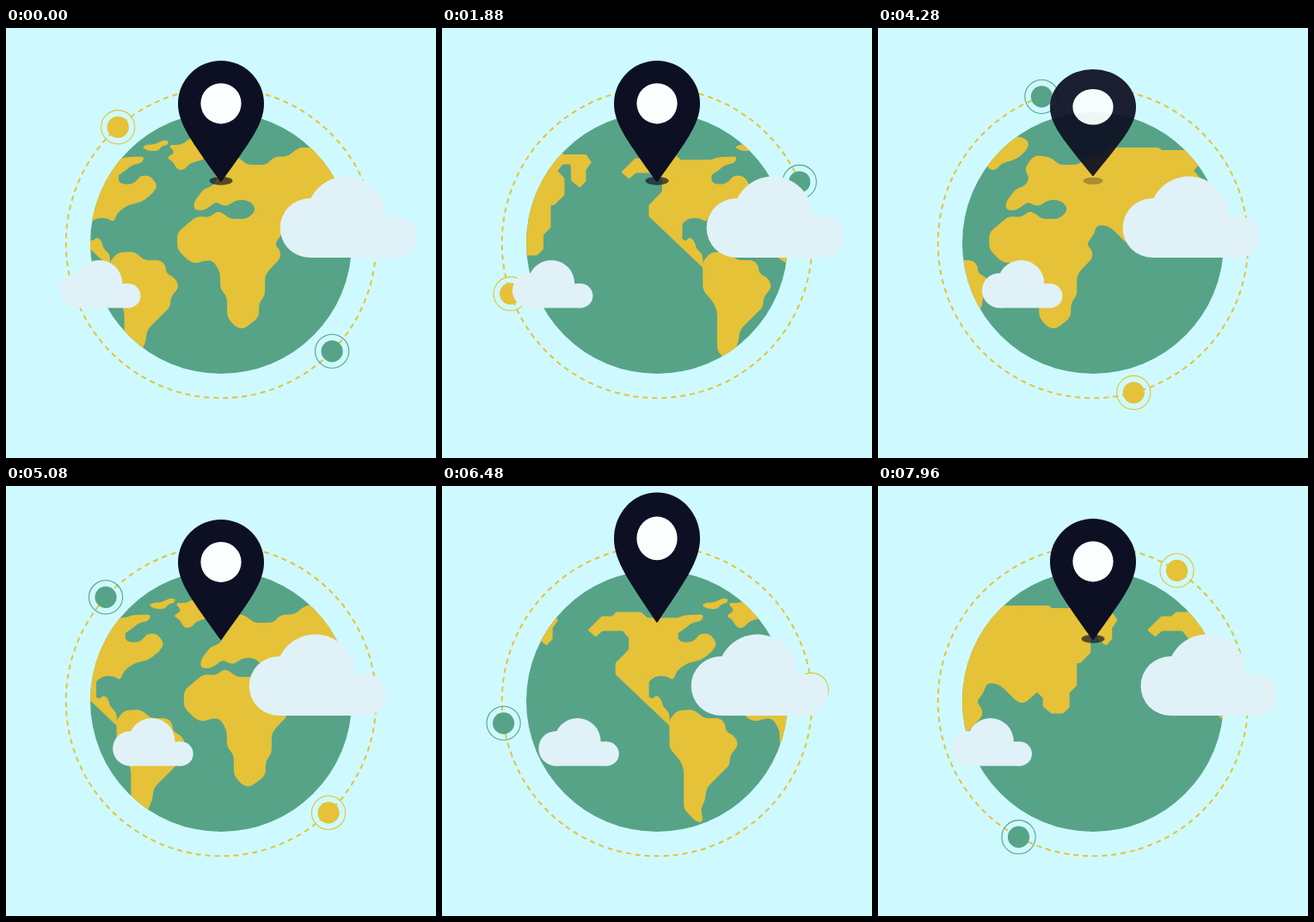
Recreate the animation shown at these times as an HTML page. Size 500 px wide and 500 px high, loop 8 s.

```html
<!DOCTYPE html>
<html lang="en">
<head>
<meta charset="utf-8">
<title>Turning globe</title>
<style>
  html, body { margin: 0; width: 100%; height: 100%; overflow: hidden; background: #cefaff; }
  svg { display: block; width: 100%; height: 100%; }
</style>
</head>
<body>
<svg viewBox="0 0 500 500">
  <defs>
    <clipPath id="disc"><circle cx="250" cy="250" r="152"/></clipPath>
    <g id="land" fill="#e5c238"></g>
    <g id="cloud" fill="#e0f2f8">
      <circle cx="34.5" cy="-34.5" r="34.5"/>
      <circle cx="77" cy="-48.5" r="46"/>
      <circle cx="135" cy="-24" r="24"/>
      <path d="M34 0V-40H110V-48H135V0Z"/>
    </g>
  </defs>
  <g id="orbit" fill="none">
    <circle cx="250" cy="250" r="180.3" stroke="#e5c238" stroke-width="2" stroke-dasharray="6 5"/>
  </g>
  <g id="moons"></g>
  <circle cx="250" cy="250" r="152" fill="#57a388"/>
  <g clip-path="url(#disc)">
    <use id="mapA" href="#land"/>
    <use id="mapB" href="#land"/>
  </g>
  <ellipse id="shade" cx="250" cy="177.8" fill="#0d1022"/>
  <g id="pin">
    <path d="M200 88A50 50 0 0 1 300 88C300 112 283 133 251 178.3Q250 179.7 249 178.3C217 133 200 112 200 88Z" fill="#0d1022"/>
    <circle cx="250" cy="87.8" r="23.6" fill="#fbfefe"/>
  </g>
  <use id="bigCloud" href="#cloud"/>
  <use id="smallCloud" href="#cloud"/>
</svg>
<script>
const LOOP = 8000, MAP_W = 485, MAP_SPEED = 97, SPIN = 35.88, DRIFT = 10040, HOP = 2000;
const $ = id => document.getElementById(id);
const NS = 'http://www.w3.org/2000/svg';

function add(parent, tag, attrs) {
  const el = document.createElementNS(NS, tag);
  for (const k in attrs) el.setAttribute(k, attrs[k]);
  parent.appendChild(el);
  return el;
}

// Closed polygon with corners rounded by up to r.
function rounded(text, r) {
  const pts = text.trim().split(/\s+/).map(p => p.split(',').map(Number));
  const toward = (a, b) => {
    const d = Math.hypot(b[0] - a[0], b[1] - a[1]);
    const k = Math.min(r / d, 0.5);
    return [a[0] + (b[0] - a[0]) * k, a[1] + (b[1] - a[1]) * k].map(v => v.toFixed(1));
  };
  return pts.map((p, i) => {
    const prev = pts[(i + pts.length - 1) % pts.length];
    const next = pts[(i + 1) % pts.length];
    return `${i ? 'L' : 'M'}${toward(p, prev)}Q${p} ${toward(p, next)}`;
  }).join('') + 'Z';
}

const lands = [
  // Europe, Africa and southern Asia
  [6, `240,164 250,149 261,148 273,152 280,159 303,159 311,150 328,149 340,139 400,139 400,235
    383,239 375,247 367,253 358,250 346,237 337,230 324,229 321,240 312,251 319,259 319,268 307,280 301,288
    301,311 294,320 294,336 281,347 274,350 266,347 257,336 257,313 249,303 249,284 241,271
    233,270 220,274 211,270 199,257 199,238 213,226 222,219 237,220 245,213 252,215 260,222 280,222
    289,214 289,207 281,200 267,200 258,207 251,206 244,202 231,212 219,212 218,203 230,187 240,184 246,175`],
  // East Asia
  [1, `341,139 360,139 368,147 386,147 391,142 439,142 444,147 470,147 476.5,156 470,165 470,178 463,185.5
    453,178 452,158.5 443,158.5 437,166 445,175 445,194 433,206 429,206 429,232 420.5,240.5 420.5,257 413,264.5
    399,264.5 389.5,256 389.5,246.5 382.5,239.5 374,247 350,225`],
  // Western North America down to the isthmus
  [1, `26,167.5 42,151.5 54,151.5 59,146.5 88,146.5 95.5,153.5 131,153.5 131,213 117,221 105,221 97,227
    97,246 104,248 113,263 121,268 121,279 58,219 58,206 73.5,190 73.5,177 66.5,168.5 43,168.5 35,175.5`],
  // Eastern North America
  [5, `90,153.5 131,153.5 138,150 161,149.5 158,157 147,159 137,167 128,173 133,181 144,182 151,179 156,171.5
    168,172 176,183 171,192 158,202 142,206 130,214 125,226 118,221 105,221 94,228 90,210`],
  [4, `92,225 104,220 93,232 93,244 100,249 105,243 111,247 113,256 121,264 120,276 92,249`],
  // South America
  [5, `120.5,272 130,261 149,260 161,270 180,270 186,277 186,285 197,291 201,301 191,314 191,324 164,351
    162,366 157,376 160,387 157,392 149,388 137.5,375 137.5,330 134,320 121,305`],
  // Northern islands
  [4, `158,139 163,135.5 173,135.5 182,130.5 189,131 188,136 181,137 177,143 166,143`],
  [6, `188,136 204,136 214,128 237,126 246,133 242,143 230,153 214,157 207,165 199,165 194,155 186,151 197,145`]
];
for (const [r, text] of lands) add($('land'), 'path', { d: rounded(text, r) });

const moons = [['#e5c238', 228.4], ['#57a388', 44.3]].map(([color, start]) => {
  const g = add($('moons'), 'g', {});
  add(g, 'circle', { r: 12.6, fill: color });
  add(g, 'circle', { r: 19.6, fill: 'none', stroke: color, 'stroke-width': 1.1 });
  return { g, start };
});

// Each row: time in the hop, then the values there.
const pinKeys = [
  [0, 0, 1, 1], [110, 0, 1, 1], [280, 1.5, .88, .93], [420, -30, 1.1, 1], [520, -23, 1.06, 1],
  [610, 2, .95, 1], [720, -3, 1.03, 1], [840, -2, 1.015, 1], [960, 1, .98, 1],
  [1040, 0, 1, 1], [1120, 1, .986, 1], [1160, 1, .986, 1], [1300, 0, 1, 1], [HOP, 0, 1, 1]
];
const shadeKeys = [
  [0, 13.5, .68], [120, 13.5, .68], [280, 11.5, .3], [360, 9, 0], [1120, 12.5, 0],
  [1160, 13.5, .56], [1240, 13.5, .68], [HOP, 13.5, .68]
];

function sample(keys, t) {
  const i = keys.findIndex(k => k[0] > t);
  const a = keys[i - 1], b = keys[i];
  const u = (t - a[0]) / (b[0] - a[0]);
  const e = u * u * (3 - 2 * u);
  return a.slice(1).map((v, j) => v + (b[j + 1] - v) * e);
}

const move = (el, x, y, rest = '') => el.setAttribute('transform', `translate(${x} ${y})${rest}`);

function draw(t) {
  const turn = SPIN * t / 1000;
  $('orbit').setAttribute('transform', `rotate(${-turn} 250 250)`);
  for (const { g, start } of moons) {
    const a = (start - turn) * Math.PI / 180;
    move(g, 250 + 180.3 * Math.cos(a), 250 + 180.3 * Math.sin(a));
  }

  const x = MAP_SPEED * t / 1000 % MAP_W;
  move($('mapA'), x, 0);
  move($('mapB'), x - MAP_W, 0);

  const sway = Math.cos(2 * Math.PI * t / DRIFT);
  move($('bigCloud'), 300.7 + 18 * sway, 267);
  move($('smallCloud'), 93.6 - 30.6 * sway, 325.5, ' scale(.588)');

  const [dy, sy, alpha] = sample(pinKeys, t % HOP);
  move($('pin'), 0, 108.5 + dy, ` scale(1 ${sy}) translate(0 -108.5)`);
  $('pin').setAttribute('opacity', alpha);
  const [rx, dark] = sample(shadeKeys, t % HOP);
  $('shade').setAttribute('rx', rx);
  $('shade').setAttribute('ry', rx * .36);
  $('shade').setAttribute('opacity', dark);
}

const began = performance.now();
function tick() {
  draw((performance.now() - began) % LOOP);
  requestAnimationFrame(tick);
}
draw(0);
requestAnimationFrame(tick);
</script>
</body>
</html>
```
